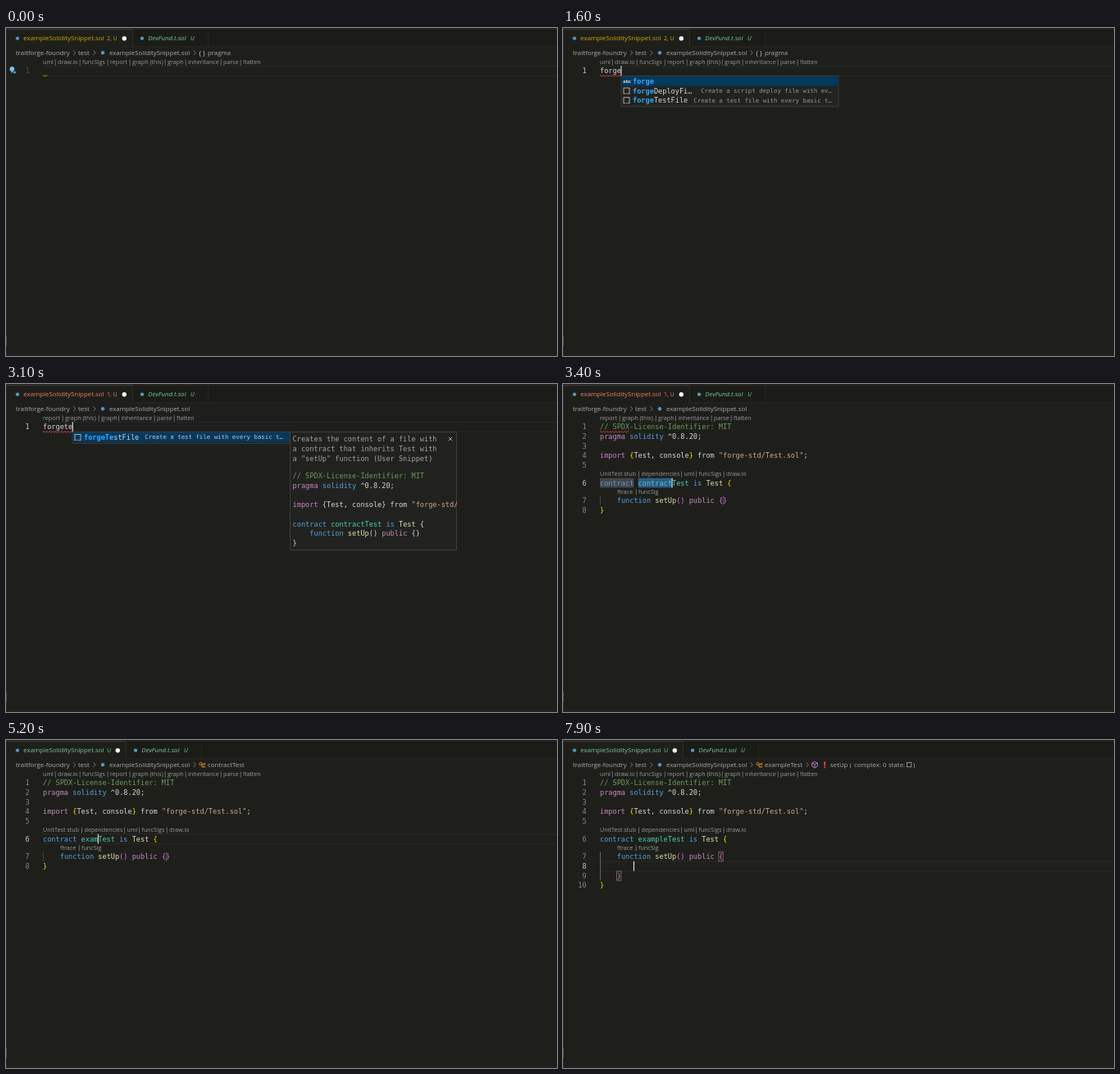
An HTML page for the animation above (8000 ms loop, 672 by 400 pixels).

```html
<!DOCTYPE html>
<html lang="en">
<head>
<meta charset="utf-8">
<title>Snippet demo</title>
<style>
  html, body { margin: 0; width: 100%; height: 100%; overflow: hidden; background: #1e1f1b; }
  svg { display: block; }
  text { white-space: pre; }
  .ui { font: 7.85px "Open Sans", "Noto Sans", sans-serif; }
  .lens { font: 7.2px "Open Sans", "Noto Sans", sans-serif; fill: #999; }
  .code { font: 8.6px "DejaVu Sans Mono", monospace; }
  .desc { font: 7.38px "DejaVu Sans Mono", monospace; }
  .it { font-style: italic; }
  .small { font-size: 7px; }
  .hit { font-weight: bold; fill: #2aaaff; }
</style>
</head>
<body>
<svg id="stage" width="672" height="400" viewBox="0 0 672 400"></svg>
<script>
const LOOP = 8000, CW = 5.177, LEFT = 45, ROW = 11.67, POP_Y = 58.5;
const COLORS = {
  w: '#d4d4d4', k: '#569cd6', p: '#c586c0', t: '#4ec9b0', f: '#dcdcaa',
  s: '#cfa28c', c: '#6a9955', g: '#ffd700', o: '#da70d6', d: '#a0a0a0'
};
const FULL = '45 uml|63 draw.io|93 funcSigs|127 report|154 graph (this)|197 graph|222 inheritance|265 parse|289 flatten';
const SHORT = '45 report|72 graph (this)|116 graph|140.5 inheritance|184 parse|208 flatten';
const FILE = 'exampleSoliditySnippet.sol';

// Each step overrides part of the state before it.
const STEPS = [
  [0, { tab: '2', crumb: 0, lens: FULL, typed: '', bulb: true, dim: true, cursor: false, pop: false }],
  [100, { dim: false, cursor: true }],
  [600, { typed: 'f', bulb: false }],
  [900, { pop: true }],
  [1000, { typed: 'for' }],
  [1200, { typed: 'forg' }],
  [1500, { typed: 'forge' }],
  [1900, { typed: 'forget' }],
  [2000, { tab: '1', crumb: 1, lens: SHORT }],
  [2100, { typed: 'forgete' }],
  [3200, { full: true, name: 'contract', sel: true, line: 6, pop: false }],
  [3700, { cursor: false }],
  [4000, { tab: '', crumb: 2, lens: FULL, cursor: true }],
  [4500, { name: 'e', sel: false }],
  [4600, { pop: true }],
  [4700, { name: 'ex' }],
  [4800, { name: 'exa', pop: false }],
  [5200, { name: 'exam' }],
  [5300, { name: 'exampl' }],
  [5400, { name: 'example' }],
  [5700, { line: 7 }],
  [5800, { crumb: 3 }],
  [6200, { cursor: false }],
  [6900, { split: true, line: 8, cursor: true }],
  [7600, { cursor: false }],
  [7900, { cursor: true }]
];
let state = {};
const scenes = STEPS.map(([at, part]) => [at, state = { ...state, ...part }]);

const text = (x, y, s, fill, cls = 'ui', extra = '') =>
  `<text x="${x}" y="${y}" class="${cls}" fill="${fill}" ${extra}>${s}</text>`;
const rect = (x, y, w, h, fill, extra = '') =>
  `<rect x="${x}" y="${y}" width="${w}" height="${h}" fill="${fill}" ${extra}/>`;
const dot = (x, y, r, fill) => `<circle cx="${x}" cy="${y}" r="${r}" fill="${fill}"/>`;
const path = (d, stroke, w = 0.8) =>
  `<path d="${d}" fill="none" stroke="${stroke}" stroke-width="${w}"/>`;
const col = n => LEFT + n * CW;
const base = n => 55.2 + (n - 1) * ROW + (n > 5 ? 10 : 0) + (n > 6 ? 10 : 0);

// Tokens start with their colour key.
const code = (x, y, ...tokens) => text(x, y, tokens.map(t =>
  `<tspan fill="${COLORS[t[0]]}">${t.slice(1)}</tspan>`).join(''), COLORS.w, 'code');

function lens(y, list) {
  return list.split('|').map((item, i) => {
    const gap = item.indexOf(' '), x = +item.slice(0, gap);
    const bar = i ? rect(x - 3.2, y - 5.8, 0.7, 7.2, '#8a8a8a') : '';
    return bar + text(x, y, item.slice(gap + 1), '', 'lens');
  }).join('');
}

function squiggle(x, end, color) {
  let d = `M${x} 58.4`;
  for (let i = 0; x < end - 1; i++, x += 1.85) d += `q.92 ${i % 2 ? 1.5 : -1.5} 1.85 0`;
  return path(d, color, 0.8);
}

const ICONS = {
  abc: (x, y) => text(x - 4.5, y + 2, 'abc', '#ddd', 'ui', 'style="font-size:5.6px;font-weight:bold"'),
  snip: (x, y) => rect(x - 3.5, y - 3.5, 7, 7, 'none', 'stroke="#ccc" stroke-width=".8"') +
    path(`M${x - 1.8} ${y + 3.5}h1.1m1.4 0h1.1`, '#252526', 1),
  cls: (x, y) => path(`M${x - 3.5} ${y - 1}l2.2-2.2 1.8 1.8-2.2 2.2zM${x} ${y - 0.5}h2.2M${x} ${y}v2.6h2` +
    `M${x + 2} ${y - 1}l1-1 1 1-1 1zM${x + 2} ${y + 2.4}l1-1 1 1-1 1z`, '#ee9d28', 0.9),
  cube: (x, y, c = '#b180d7') => path(`M${x} ${y - 3.8}l3.3 1.7v4L${x} ${y + 3.8}l-3.3-1.9v-4z` +
    `m-3.3 1.7l3.3 1.7 3.3-1.7M${x} ${y - 0.4}v4.2`, c, 0.9),
  key: (x, y) => path(`M${x - 3.5} ${y - 2.5}h3m1 0h3M${x - 3.5} ${y}h2m1 0h4M${x - 3.5} ${y + 2.5}h4m1 0h2`, '#ccc', 1)
};

function popup(x, y, hits, items) {
  let out = rect(x, y, 265, items.length * ROW + 2.3, '#222320', 'stroke="#454545" stroke-width=".7"') +
    rect(x + 0.4, y + 0.4, 264.2, ROW + 0.2, '#04395e');
  items.forEach(([icon, label, desc], i) => {
    const mid = y + 6.4 + i * ROW;
    out += ICONS[icon](x + 6.5, mid) + text(x + 14, mid + 3,
      `<tspan class="hit">${label.slice(0, hits)}</tspan>${label.slice(hits)}`, '#d4d4d4', 'code');
    if (desc) out += text(x + 257, mid + 2.4, desc, i ? '#929292' : '#b8c2ca', 'desc', 'text-anchor="end"');
  });
  return out;
}

function detail(x, h, lines) {
  const rows = lines.map(([y, ...tokens]) => code(3.6, y, ...tokens)).join('');
  return `<svg x="${x}" y="58" width="204" height="${h}">` +
    rect(0.4, 0.4, 203.2, h - 0.8, '#21221f', 'stroke="#454545" stroke-width=".8"') + rows +
    path('M193.8 6.8l4.4 4.4m0-4.4l-4.4 4.4', '#ccc') + '</svg>';
}

const fileDetail = (kind, fn, intro) => [
  [12.3, 'dCreates the content of a file with'], [24, 'd' + intro[0]], [35.6, 'd' + intro[1]],
  [57.2, 'c// SPDX-License-Identifier: MIT'], [68.9, 'ppragma ', 'ksolidity ', 'w^0.8.20;'],
  [92.3, 'pimport ', `w{${kind}, console} from `, `s"forge-std/${kind}.sol"`, 'w;'],
  [115.7, 'kcontract ', `tcontract${kind} `, 'kis ', `f${kind} `, 'w{'],
  [127.3, 'k    function ', 'f' + fn, 'w() ', 'ppublic ', 'w{}'],
  [139, 'w}']
];

const DEPLOY = ['snip', 'forgeDeployFi…', 'Create a script deploy file with ev…'];
const TEST = ['snip', 'forgeTestFile', 'Create a test file with every basic t…'];

function typedPopup(s) {
  const n = s.length, x = Math.round(col(n));
  if (n === 1) {
    const words = ['fallback', 'false', 'final', 'finney', 'fixed', 'for'].map(w => ['key', w]);
    return popup(x, POP_Y, n, [...words, DEPLOY, TEST]);
  }
  if (n === 3) {
    return popup(x, POP_Y, n, [['snip', 'for', 'for loop'], DEPLOY, TEST]) +
      detail(x + 265, 60, [[12.3, 'dfor loop (Snippet)'], [33, 'pfor ', 'w(uint i = 0; i &lt; n; i++) {'], [44.7, 'w}']]);
  }
  if (n === 4) {
    return popup(x, POP_Y, n, [DEPLOY, TEST]) +
      detail(x + 265, 145, fileDetail('Script', 'run', ['a contract that inherits Script', 'and a "run" function (User Snippet)']));
  }
  if (n === 5) return popup(x, POP_Y, n, [['abc', 'forge'], DEPLOY, TEST]);
  return popup(x, POP_Y, n, [TEST]) +
    detail(x + 265, 145, fileDetail('Test', 'setUp', ['a contract that inherits Test with', 'a "setUp" function (User Snippet)']));
}

function tabs(s) {
  const color = { 2: '#cca700', 1: '#f07865', '': '#73c991' }[s.tab];
  const end = s.tab ? 154 : 146, green = '#73c991', y = 15.2;
  return rect(end, 1, 672 - end, 21.5, '#1b1c18') + rect(end, 22.5, 672 - end, 0.8, '#282925') +
    rect(0, 1, 672, 0.8, '#2c2d29') + rect(0, 1, end, 0.8, '#44453f') +
    rect(end, 2, 0.8, 21, '#30312c') + rect(end + 92, 2, 0.8, 21, '#2a2b27') +
    dot(14, 12.6, 2.2, '#519aba') + text(21.3, y, FILE, color) +
    text(123, y, s.tab ? s.tab + ', U' : 'U', color, 'ui small') + dot(end - 9.7, 12.7, 2.7, '#fff') +
    dot(end + 12, 12.6, 2.2, '#519aba') + text(end + 19.3, y, 'DevFund.t.sol', green, 'ui it') +
    text(end + 71, y, 'U', green, 'ui it small');
}

function crumbs(s) {
  const grey = '#a9a9a9', y = 32.8, mid = 30.2;
  const chevron = x => path(`M${x - 1.3} ${mid - 2.8}l2.6 2.8-2.6 2.8`, '#8a8a8a');
  const word = (x, w) => text(x, y, w, grey);
  let out = word(12, 'traitforge-foundry') + chevron(83.5) + word(88, 'test') +
    chevron(107.8) + dot(118, mid, 2.2, '#519aba') + word(126, FILE);
  if (s.crumb !== 1) out += chevron(230);
  if (s.crumb === 0) out += text(235, y, '{ }', '#ccc') + word(246, 'pragma');
  if (s.crumb > 1) out += ICONS.cls(239, mid) + word(246, s.crumb === 2 ? 'contractTest' : 'exampleTest');
  if (s.crumb === 3) {
    out += chevron(298) + ICONS.cube(307, mid) + rect(318.2, 26.2, 2, 5.4, '#e0393e') + dot(319.2, 33.4, 1.1, '#e0393e') +
      word(326, 'setUp') + word(349.5, '(') + word(355, 'complex: 0') + word(397, 'state:') + word(427, ')') +
      rect(419.4, 27.4, 5.4, 5.4, 'none', 'stroke="#a9a9a9" stroke-width=".8"');
  }
  return out;
}

const chrome = s => rect(0, 0, 672, 400, '#1e1f1b') + rect(0, 1, 0.8, 399, '#2c2d29') +
  rect(0, 375, 1, 13, '#4a5058') + rect(0, 398, 672, 0.8, '#282925') +
  tabs(s) + crumbs(s) + lens(44.2, s.lens);

const number = (n, on, dim) => text(28.6, base(n), n, dim ? '#4c4d48' : on ? '#c6c6c6' : '#858585', 'code', 'text-anchor="end"');
const caret = (x, n) => rect(x - 0.5, base(n) - 8.8, 1.1, 11.7, '#e4e4e4');
const box = (x, n) => rect(x, base(n) - 8.6, CW, 11.2, 'none', 'stroke="#888" stroke-width=".7"');
const current = n => rect(LEFT, base(n) - 9.2, 627, 0.9, '#292a26') + rect(LEFT, base(n) + 2.6, 627, 0.9, '#292a26');

function blank(s) {
  const n = s.typed.length;
  let out = current(1) + number(1, true, s.dim) + code(LEFT, base(1), 'w' + s.typed);
  out += n > 1 ? squiggle(LEFT, col(n), '#f14c4c') : squiggle(LEFT, 50, '#cca700');
  if (s.bulb) out += dot(7.4, 50, 2.9, '#75beff') + path('M6.3 53.8h2.2', '#d8d8d8', 1) + dot(10.6, 54, 1.5, '#3f9fd8');
  if (s.cursor) out += caret(col(n), 1);
  return out + (s.pop ? typedPopup(s.typed) : '');
}

function contract(s) {
  const last = s.split ? 10 : 8, end = 9 + s.name.length;
  let out = s.sel ? '' : current(s.line);
  for (let n = 1; n <= last; n++) out += number(n, n === s.line);
  if (s.sel) {
    out += rect(LEFT, base(6) - 8.8, 8 * CW, 11.6, '#45464a') + rect(col(9), base(6) - 8.8, 8 * CW, 11.6, '#2b5c8a');
  }
  out += rect(LEFT, base(7) - 8.8, 0.8, s.split ? 35 : 11.7, s.line > 6 ? '#707070' : '#484946');
  out += code(LEFT, base(1), 'c// SPDX-License-Identifier: MIT') +
    code(LEFT, base(2), 'ppragma ', 'ksolidity ', 'w^0.8.20;') +
    code(LEFT, base(4), 'pimport ', 'g{', 'wTest, console', 'g}', 'w from ', 's"forge-std/Test.sol"', 'w;') +
    lens(112.2, '45 UnitTest stub|95.5 dependencies|147.5 uml|165.5 funcSigs|199 draw.io') +
    code(LEFT, base(6), 'kcontract ', `t${s.name}Test `, 'kis ', 'fTest ', 'g{') +
    lens(134, '66 ftrace|92 funcSig') +
    code(col(4), base(7), 'kfunction ', 'fsetUp', 'o() ', 'ppublic ', s.split ? 'o{' : 'o{}') +
    code(LEFT, base(last), 'g}');
  if (s.split) out += code(col(4), base(9), 'o}') + box(col(4), 9);
  if (s.line > 6) out += box(col(28), 7) + (s.split ? '' : box(col(29), 7));
  else out += rect(col(29) - 0.3, base(7) - 8.8, 0.7, 11.7, '#7a7a7a');
  if (s.tab) out += squiggle(LEFT, 81, '#f14c4c');
  if (s.cursor) out += caret(col({ 6: end, 7: 29, 8: 8 }[s.line]), s.line);
  if (s.pop) {
    const own = ['cls', s.name + 'Test'], ext = ['key', 'external'];
    out += popup(Math.round(col(end)), 126.7, s.name.length,
      s.name === 'e' ? [['cube', 'ecrecover', '', '#ddd'], own, ext] : [own, ext]);
  }
  return out;
}

const stage = document.getElementById('stage');
let shown = null;
function tick() {
  const t = performance.now() % LOOP;
  let scene = scenes[0][1];
  for (const [at, s] of scenes) if (t >= at) scene = s;
  if (scene !== shown) {
    shown = scene;
    stage.innerHTML = chrome(scene) + (scene.full ? contract(scene) : blank(scene));
  }
  requestAnimationFrame(tick);
}
tick();
</script>
</body>
</html>
```
